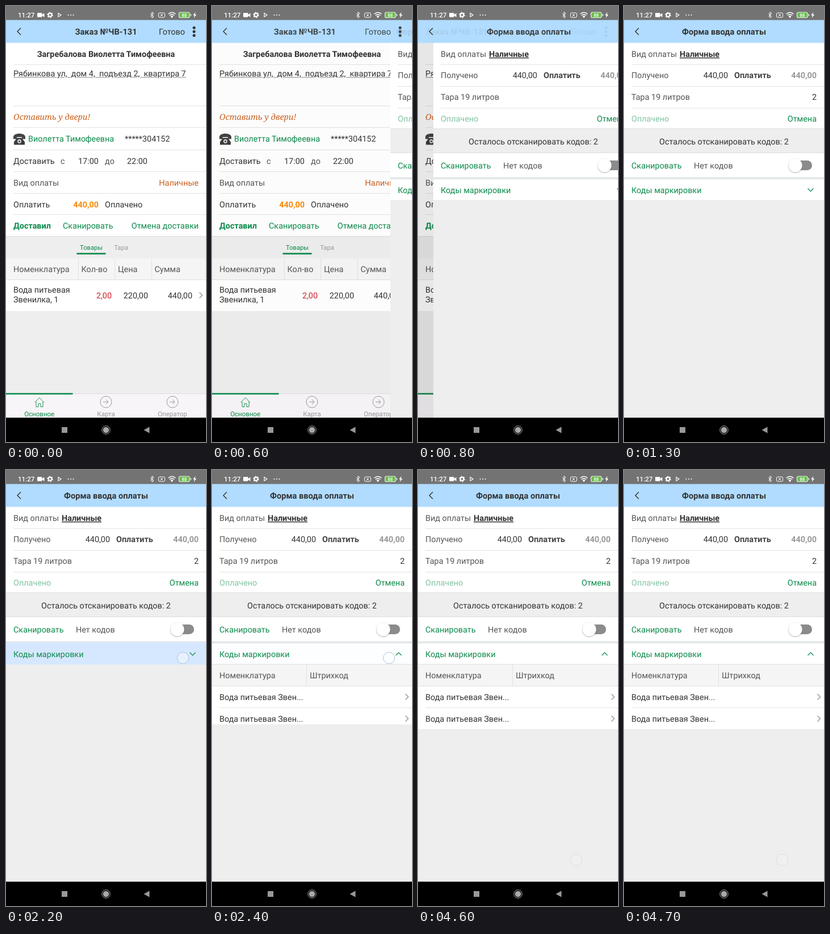
An HTML page that plays this animation: 352x762 px, repeating every 5500 ms.

```html
<!DOCTYPE html>
<html lang="ru">
<head>
<meta charset="utf-8">
<title>Форма ввода оплаты</title>
<style>
  html, body { margin: 0; width: 100%; height: 100%; overflow: hidden; background: #000; }
  svg { display: block; width: 100%; height: 100%; }
  text { font: 14.4px Roboto, sans-serif; fill: #333; white-space: pre; text-rendering: geometricPrecision; }
  .soft { fill: #555; }
  .bold { font-weight: 700; }
  .dark { fill: #444; }
  .green { fill: #0b8a4b; }
  .pale { fill: #80c4a2; }
  .rust { fill: #c9601c; }
  .orange { fill: #f98c0a; }
  .red { fill: #d0202c; }
  .gray { fill: #999; }
  .end { text-anchor: end; }
  .mid { text-anchor: middle; }
  .title { font-size: 14.6px; font-weight: 700; }
  .tab { font-size: 11.2px; text-anchor: middle; }
  .menu { font-size: 11.5px; text-anchor: middle; }
  .note { font: italic 14.4px "Noto Serif", serif; }
  .clock { font-size: 11.6px; font-weight: 500; fill: #fff; }
  .charge { font-size: 8px; font-weight: 500; fill: #fff; text-anchor: middle; }
  .line { text-decoration: underline; text-decoration-thickness: 1.3px; }
  .thin { text-decoration: underline; text-decoration-thickness: 1px; fill: #aaa; }
  .thin tspan { fill: #333; }
</style>
</head>
<body>
<svg id="stage" viewBox="0 0 352 762" preserveAspectRatio="none"></svg>
<script>
const text = (x, y, str, cls = '') => `<text x="${x}" y="${y}" class="${cls}">${str}</text>`;
const box = (x, y, w, h, fill, extra = '') =>
  `<rect x="${x}" y="${y}" width="${w}" height="${h}" fill="${fill}" ${extra}/>`;
const stroke = (d, color, width = 1) =>
  `<path d="${d}" fill="none" stroke="${color}" stroke-width="${width}"/>`;
const shape = (d, fill) => `<path d="${d}" fill="${fill}"/>`;
const disc = (x, y, r, fill, extra = '') => `<circle cx="${x}" cy="${y}" r="${r}" fill="${fill}" ${extra}/>`;
const rules = (...ys) => ys.map(y => box(13, y, 339, 1, '#e3e3e3')).join('');
const columns = (y, ...xs) => xs.map(x => box(x, y, 1, 37, '#e2e2e2')).join('');
const next = y => stroke(`M340.5 ${y - 5}l5 5-5 5`, '#8c8c8c', 1.2);
const arrowItem = (x, label) => disc(x, 692, 10, 'none', 'stroke="#999"') +
  stroke(`M${x - 5} 692h9m-4-4l4 4-4 4`, '#999') + text(x, 717, label, 'menu gray');

const handset = shape('M13 229c0-8 21-8 21 0v3.5h-6v-3.5h-9v3.5h-6z', '#444') +
  shape('M19.5 230.5h8l5.500 7v5h-19v-5z', '#3c3c3c') +
  disc(23.5, 236.5, 3.4, '#ddd') + disc(23.5, 236.5, 1.5, '#3c3c3c');

const orderPage = box(0, 64, 352, 656, '#eee') + box(0, 64, 352, 339, '#fff') +
  rules(102, 174, 212, 251, 289, 327, 364) +
  text(176, 89, 'Загребалова Виолетта Тимофеевна', 'mid bold') +
  text(13, 123, '<tspan>Рябинкова ул,  дом 4,  подъезд 2,  квартира 7</tspan>', 'thin') +
  text(13, 199, 'Оставить у двери!', 'note rust') +
  handset + text(39, 237, 'Виолетта Тимофеевна', 'green') + text(209, 237, '*****304152') +
  text(13, 276, 'Доставить') + text(96, 276, 'с', 'soft') + text(127, 276, '17:00') +
  text(174, 276, 'до', 'soft') + text(213, 276, '22:00') +
  text(13, 314, 'Вид оплаты', 'soft') + text(339, 314, 'Наличные', 'rust end') +
  text(13, 352, 'Оплатить') + text(163, 352, '440,00', 'bold orange end') + text(174, 352, 'Оплачено') +
  text(13, 389, 'Доставил', 'green bold') + text(100, 389, 'Сканировать', 'green') +
  text(339, 389, 'Отмена доставки', 'green end') +
  box(0, 402, 352, 1, '#ddd') +
  text(150, 426, 'Товары', 'tab green') + text(202.5, 426, 'Тара', 'tab gray') +
  box(124.5, 431.5, 51, 2.7, '#0b8a4b') +
  box(0, 441, 352, 37, '#f5f5f5') + columns(441, 127, 191, 256) + box(0, 478, 352, 1, '#e0e0e0') +
  [[13, 'Номенклатура'], [132.5, 'Кол-во'], [197, 'Цена'], [261.5, 'Сумма']]
    .map(([x, label]) => text(x, 465, label, 'soft')).join('') +
  box(0, 479, 352, 54, '#fff') +
  text(13, 501, 'Вода питьевая') + text(13, 518, 'Звенилка, 1') +
  text(186, 511, '2,00', 'red end') +
  text(250, 511, '220,00', 'end') + text(328, 511, '440,00', 'end') + next(505.5) +
  box(0, 677, 352, 43, '#f7f5f7') + box(0, 677, 352, 1, '#ddd') + box(0, 676.5, 117.5, 2.5, '#0b8a4b') +
  stroke('M50.5 693l8.300-8.500 8.300 8.500M53 691.500v9h4v-5.500h4v5.500h4v-9', '#0b8a4b', .9) +
  text(58.7, 717, 'Основное', 'menu green') + arrowItem(176, 'Карта') + arrowItem(293, 'Оператор');

const codeList = box(0, 339, 352, 114, '#fff') + box(0, 339.5, 352, 38, '#f5f5f5') +
  columns(340, 166) + box(0, 339, 352, 1, '#e0e0e0') + box(0, 377, 352, 1, '#e0e0e0') + rules(415) +
  text(13, 364, 'Номенклатура', 'soft') + text(172, 364, 'Штрихкод', 'soft') +
  [402, 440].map(y => text(13, y, 'Вода питьевая Звен...') + next(y - 5.5)).join('');

const toggle = box(296, 270, 35, 17, '#8b8b8b', 'rx="8.5"') +
  disc(301.5, 279.5, 13.2, '#000', 'opacity=".07"') + disc(301.5, 279.2, 12.6, '#000', 'opacity=".15"') +
  disc(301.5, 278.5, 12.1, '#fff');

const paymentPage = box(0, 64, 352, 656, '#eee') + box(0, 64, 352, 150, '#fff') + rules(102, 140, 178) +
  text(13, 89, 'Вид оплаты', 'soft') + text(98, 89, 'Наличные', 'bold line') +
  text(13, 126, 'Получено', 'soft') + text(183, 126, '440,00', 'end') +
  text(194, 126, 'Оплатить', 'bold dark') + text(339, 126, '440,00', 'bold gray end') +
  text(13, 164, 'Тара 19 литров', 'soft') + text(339, 164, '2', 'end') +
  text(13, 202, 'Оплачено', 'pale') + text(339, 202, 'Отмена', 'green end') +
  box(0, 214, 352, 1, '#ddd') + text(176, 241.5, 'Осталось отсканировать кодов: 2', 'mid') +
  box(0, 256, 352, 1, '#ddd') + box(0, 257, 352, 42.5, '#fff') +
  text(13, 284, 'Сканировать', 'green') + text(123, 284, 'Нет кодов', 'soft') + toggle +
  box(0, 299.5, 352, 3.5, '#e3e7e7') + box(0, 303, 352, 36, '#fff') +
  box(0, 301, 352, 39, '#d6e8ff', 'id="press"') +
  text(13, 327, 'Коды маркировки', 'green') +
  `<g id="arrow">${stroke('M-5-2.5l5 5 5-5', '#0b8a4b', 1.2)}</g>` +
  `<g clip-path="url(#unfold)">${codeList}</g>`;

const statusBar = box(0, 0, 352, 25, '#737373') + text(21, 20, '11:27', 'clock') +
  box(55, 12, 8.5, 7.5, '#fff', 'rx="1"') + shape('M63 15.5l4.5-3v7l-4.5-3z', '#fff') +
  disc(77.5, 15.7, 3, 'none', 'stroke="#fff" stroke-width="2.2"') +
  disc(77.5, 15.7, 4.6, 'none', 'stroke="#fff" stroke-width="1.4" stroke-dasharray="2 2.82"') +
  stroke('M92 12.5l5 3.2-5 3.2z', '#fff', 1.2) +
  [109.5, 114, 118.5].map(x => disc(x, 15.7, 1, '#fff')).join('') +
  stroke('M254 13l6 5.5-3 2.5V10.5l3 2.5-6 5.5', '#fff') +
  box(268.5, 12, 11, 8, 'none', 'rx="2" stroke="#fff"') + stroke('M272 14l4 4m0-4l-4 4', '#fff') +
  stroke('M285.5 14q6.5-5.5 13 0M287.7 16.5q4.3-3.5 8.6 0', '#fff', 1.4) +
  shape('M289.5 18q2.5-1.8 5 0l-2.5 3z', '#fff') +
  box(304.5, 11, 18.5, 9.5, '#68bd4c', 'rx="2.5" stroke="#eee" stroke-width="1.2"') +
  box(324.5, 14, 1.5, 3.5, '#eee') + text(313.7, 18.7, '88', 'charge') +
  shape('M333.5 10.5l-4.5 5.8h2.7l-1.2 4.7 4.7-6h-2.8z', '#fff');

const header = box(0, 24.5, 352, 40, '#b1dcff') +
  stroke('M26 38.5l-6 6 6 6', '#333', 1.4) +
  `<g id="oldTitle">${text(176, 50, 'Заказ №ЧВ-131', 'title mid')}</g>` +
  `<g id="oldActions">${text(315, 50, 'Готово', 'end')}${[38, 44.7, 51.4].map(y => disc(331, y, 2.5, '#333')).join('')}</g>` +
  `<g id="newTitle">${text(176, 50, 'Форма ввода оплаты', 'title mid')}</g>`;

const systemKeys = box(0, 719.5, 352, 43, '#000') + box(98, 736, 10, 10, '#999') +
  disc(176, 741, 5.3, '#a8a8a8') + disc(176, 741, 7.2, 'none', 'stroke="#a8a8a8"') +
  shape('M252.5 735.5v11l-10-5.5z', '#999');

const stage = document.getElementById('stage');
stage.innerHTML = `<defs><clipPath id="unfold"><rect id="unfoldBox" y="339" width="352" height="0"/></clipPath></defs>
  ${orderPage}${box(0, 64, 352, 656, '#000', 'id="shade"')}
  <g id="payment">${paymentPage}</g>${statusBar}${header}${systemKeys}
  ${disc(0, 0, 10, '#fff', 'id="touch"')}`;

const part = id => document.getElementById(id);
const set = (id, attrs) => { for (const key in attrs) part(id).setAttribute(key, attrs[key]); };

// Standard "ease" curve: cubic-bezier(.25, .1, .25, 1)
function ease(x) {
  if (x <= 0) return 0;
  if (x >= 1) return 1;
  const curve = (a, b, s) => 3 * a * s * (1 - s) ** 2 + 3 * b * s * s * (1 - s) + s ** 3;
  let low = 0, high = 1;
  for (let i = 0; i < 24; i++) {
    const s = (low + high) / 2;
    if (curve(.25, .25, s) < x) low = s; else high = s;
  }
  return curve(.1, 1, low);
}

const LOOP = 5500, STEP = 100;

function draw(now) {
  const time = Math.floor((now % LOOP) / STEP) * STEP;
  const slide = ease((time - 561) / 360);
  const open = ease((time - 2200) / 300);
  const rest = 1 - slide;

  set('payment', { transform: `translate(${352 * rest})` });
  set('shade', { opacity: .1 * slide });
  set('oldTitle', { transform: `translate(${-117 * slide})`, opacity: rest });
  set('oldActions', { opacity: rest });
  set('newTitle', { transform: `translate(${249 * rest})`, opacity: slide });

  set('press', { opacity: time >= 2200 ? 1 - open : 0 });
  set('unfoldBox', { height: 114 * open });
  set('arrow', { transform: `translate(328.5 321.5) scale(1 ${open ? -1 : 1})` });

  const firstTap = time >= 2200 && time < 2700;
  const lastTap = time >= 4600;
  set('touch', {
    cx: firstTap ? 311.5 : 278.5,
    cy: firstTap ? 328.5 : 681.5,
    stroke: firstTap ? '#aebfe2' : '#dddce0',
    'fill-opacity': firstTap ? .45 : .15,
    visibility: firstTap || lastTap ? 'visible' : 'hidden'
  });
}

const start = performance.now();
function tick() {
  draw(performance.now() - start);
  requestAnimationFrame(tick);
}
tick();
</script>
</body>
</html>
```
